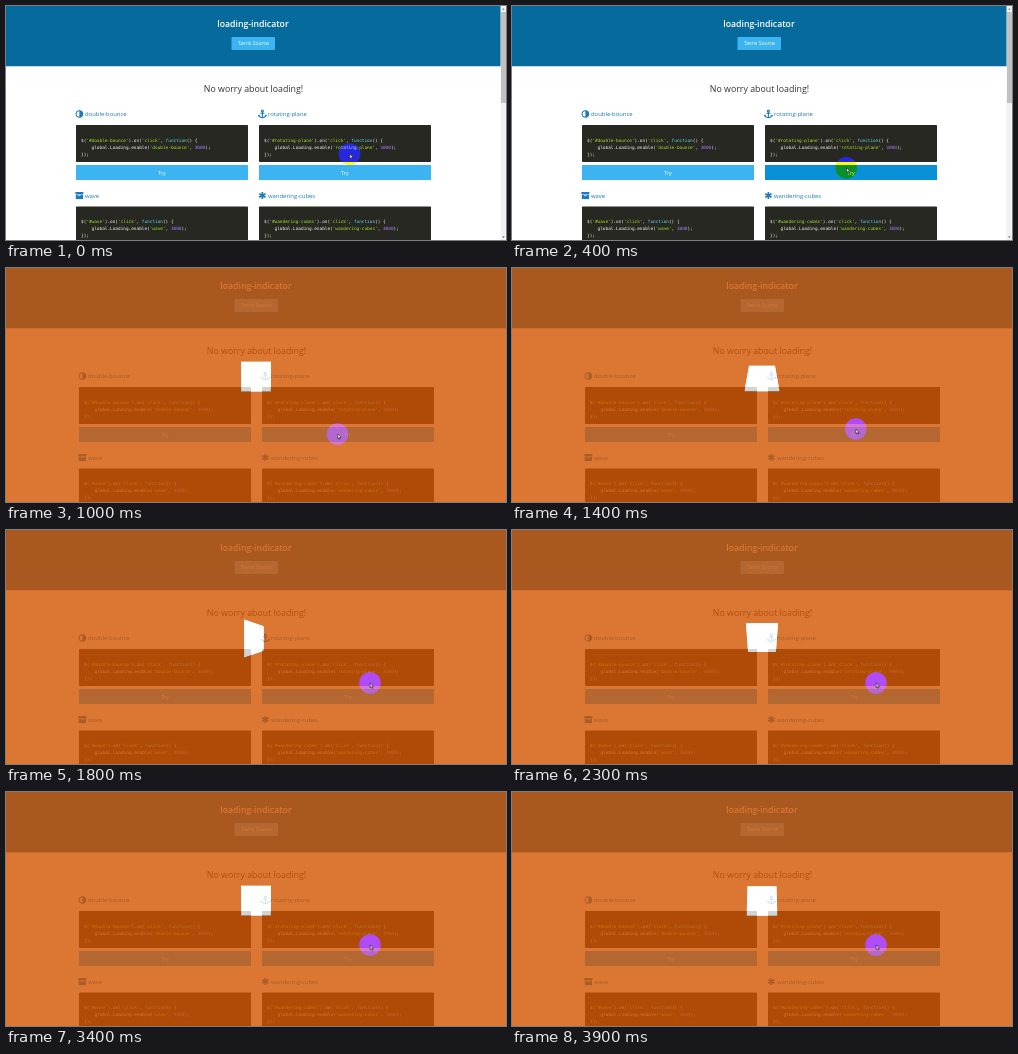
Write an HTML page with a canvas that moves like this. It is 500 px wide and 234 px high and loops after 4000 ms.

```html
<!DOCTYPE html>
<html lang="en">
<head>
<meta charset="utf-8">
<title>loading-indicator</title>
<style>
  html, body { margin: 0; width: 100%; height: 100%; overflow: hidden; background: #fff; }
  canvas { display: block; width: 500px; height: 234px; }
</style>
</head>
<body>
<canvas id="stage"></canvas>
<script>
const W = 500, H = 234, LOOP = 4000, STEP = 100, LOAD_START = 1000;
const SANS = '"Open Sans", "Noto Sans", sans-serif';
const MONO = '"DejaVu Sans Mono", monospace';
const BLUE = '#1a7bc0', BUTTON = '#3db4f2', BUTTON_HOVER = '#0a90d6';
const CODE = { bg: '#272822', plain: '#f8f8f2', string: '#a6e22e', keyword: '#66d9ef', number: '#ae81ff' };

const canvas = document.getElementById('stage');
const ctx = canvas.getContext('2d');
const ratio = window.devicePixelRatio || 1;
canvas.width = W * ratio;
canvas.height = H * ratio;

function rect(x, y, w, h, color, radius = 0) {
  ctx.fillStyle = color;
  ctx.beginPath();
  ctx.roundRect(x, y, w, h, radius);
  ctx.fill();
}

function text(str, x, y, font, color, align = 'left') {
  ctx.font = font;
  ctx.fillStyle = color;
  ctx.textAlign = align;
  ctx.fillText(str, x, y);
}

function polygon(points) {
  points.forEach(([x, y], i) => i ? ctx.lineTo(x, y) : ctx.moveTo(x, y));
  ctx.closePath();
}

// Icons are drawn around their own centre.
const icons = {
  adjust() {
    ctx.lineWidth = 1.1;
    ctx.beginPath();
    ctx.arc(0, 0, 3.3, 0, Math.PI * 2);
    ctx.stroke();
    ctx.beginPath();
    ctx.arc(0, 0, 3.4, -Math.PI / 2, Math.PI / 2);
    ctx.fill();
  },
  anchor() {
    ctx.lineWidth = 1.1;
    ctx.beginPath();
    ctx.arc(0, -3, 1, 0, Math.PI * 2);
    ctx.moveTo(0, -2);
    ctx.lineTo(0, 3.6);
    ctx.moveTo(-2, -0.8);
    ctx.lineTo(2, -0.8);
    ctx.moveTo(-3.7, 1.2);
    ctx.quadraticCurveTo(-3, 3.6, 0, 3.7);
    ctx.quadraticCurveTo(3, 3.6, 3.7, 1.2);
    ctx.stroke();
    ctx.beginPath();
    polygon([[-4.3, 2.6], [-4.1, 0.5], [-2.2, 1.7]]);
    polygon([[4.3, 2.6], [4.1, 0.5], [2.2, 1.7]]);
    ctx.fill();
  },
  archive() {
    ctx.fillRect(-4, -3.5, 8, 2);
    ctx.fillRect(-3.6, -1, 7.2, 4.6);
    ctx.fillStyle = '#fff';
    ctx.fillRect(-1.1, -0.4, 2.2, 0.8);
  },
  asterisk() {
    ctx.lineWidth = 1.7;
    ctx.beginPath();
    for (let i = 0; i < 3; i++) {
      const a = Math.PI / 2 + i * Math.PI / 3;
      ctx.moveTo(-3.6 * Math.cos(a), -3.6 * Math.sin(a));
      ctx.lineTo(3.6 * Math.cos(a), 3.6 * Math.sin(a));
    }
    ctx.stroke();
  }
};

function codeLine(x, y, parts) {
  const font = `4.4px ${MONO}`;
  for (const [kind, str] of parts) {
    text(str, x, y, font, CODE[kind]);
    x += ctx.measureText(str).width;
  }
}

function section(x, y, name, icon, hover) {
  ctx.save();
  ctx.translate(x + 3.4, y + 8);
  ctx.fillStyle = ctx.strokeStyle = BLUE;
  icons[icon]();
  ctx.restore();
  text(name, x + 9, y + 10.2, `5.9px ${SANS}`, BLUE);

  rect(x, y + 19, 172, 37, CODE.bg, 0.8);
  codeLine(x + 5, y + 35.8, [
    ['plain', '$('], ['string', `'#${name}'`], ['plain', ').on('], ['string', "'click'"],
    ['plain', ', '], ['keyword', 'function'], ['plain', '() {']
  ]);
  codeLine(x + 5, y + 42.8, [
    ['plain', '    global.Loading.enable('], ['string', `'${name}'`],
    ['plain', ', '], ['number', '3000'], ['plain', ');']
  ]);
  codeLine(x + 5, y + 49.8, [['plain', '});']]);

  rect(x, y + 59, 172, 15, hover ? BUTTON_HOVER : BUTTON, 0.6);
  text('Try', x + 86, y + 68.6, `5.4px ${SANS}`, '#fff', 'center');
}

function scrollbar() {
  rect(494.5, 0, 5.5, H, '#f1f1f1');
  rect(495, 6, 5, 91, '#c1c1c1');
  ctx.fillStyle = '#555';
  ctx.beginPath();
  polygon([[496.2, 3.6], [497.4, 2.2], [498.6, 3.6]]);
  polygon([[496.2, 230.6], [497.4, 232], [498.6, 230.6]]);
  ctx.fill();
}

function page(loading, hover) {
  const shift = loading ? 3 : 0;
  const middle = 247 + shift;
  rect(0, 0, W, H, '#fff');
  rect(0, 0, W, 60.3, '#076a9c');
  text('loading-indicator', middle, 21.4, `600 8.7px ${SANS}`, '#fff', 'center');
  rect(225.5 + shift, 31, 43.5, 13, BUTTON, 0.8);
  text('Tavrix Source', middle + 0.3, 39.3, `5px ${SANS}`, '#fff', 'center');
  text('No worry about loading!', middle + 0.5, 85.8, `8.8px ${SANS}`, '#333', 'center');

  const left = 70 + shift, right = 253 + shift;
  section(left, 100, 'double-bounce', 'adjust', false);
  section(right, 100, 'rotating-plane', 'anchor', hover);
  section(left, 181.5, 'wave', 'archive', false);
  section(right, 181.5, 'wandering-cubes', 'asterisk', false);
  if (!loading) scrollbar();
}

// cubic-bezier(.42, 0, .58, 1)
function easeInOut(x) {
  let lo = 0, hi = 1;
  for (let i = 0; i < 20; i++) {
    const s = (lo + hi) / 2, r = 1 - s;
    if (1.26 * r * r * s + 1.74 * r * s * s + s * s * s < x) lo = s;
    else hi = s;
  }
  return lo * lo * (3 - 2 * lo);
}

// Flips about the x axis, then about the y axis, seen in perspective.
function planeCorners(elapsed) {
  const half = 14.9, depth = 54;
  const phase = ((elapsed + 22) % 1200) / 600;
  const ax = -Math.PI * (phase < 1 ? easeInOut(phase) : 1);
  const ay = -Math.PI * (phase < 1 ? 0 : easeInOut(phase - 1));
  return [[-1, -1], [1, -1], [1, 1], [-1, 1]].map(([u, v]) => {
    const x = u * half * Math.cos(ay), z1 = -u * half * Math.sin(ay);
    const y = v * half * Math.cos(ax) - z1 * Math.sin(ax);
    const z = v * half * Math.sin(ax) + z1 * Math.cos(ax);
    const k = depth / (depth - z);
    return [250 + x * k, 108.6 + y * k];
  });
}

function loader(elapsed) {
  const corners = planeCorners(elapsed);
  ctx.globalAlpha = 0.8;
  ctx.fillStyle = '#d35400';
  ctx.beginPath();
  ctx.rect(0, 0, W, H);
  polygon(corners);
  ctx.fill('evenodd');
  ctx.fillStyle = '#fff';
  ctx.beginPath();
  polygon(corners);
  ctx.fill();
  ctx.globalAlpha = 1;
}

const path = [[0, 343.5, 148], [600, 331.5, 166], [1100, 331.5, 166], [1800, 364, 153], [LOOP, 364, 153]];

function cursorAt(t) {
  const i = path.findIndex(([time]) => time > t);
  const [t0, x0, y0] = path[i - 1], [t1, x1, y1] = path[i];
  const k = easeInOut((t - t0) / (t1 - t0));
  return [x0 + (x1 - x0) * k, y0 + (y1 - y0) * k];
}

function cursor(x, y) {
  ctx.globalCompositeOperation = 'difference';
  ctx.fillStyle = '#00f';
  ctx.beginPath();
  ctx.arc(x, y, 10.8, 0, Math.PI * 2);
  ctx.fill();
  ctx.globalCompositeOperation = 'source-over';

  ctx.save();
  ctx.translate(x, y);
  ctx.beginPath();
  polygon([[0.2, 0], [0.2, 4.6], [1.3, 3.7], [2, 5.3], [2.8, 4.9], [2.1, 3.4], [3.5, 3.3]]);
  ctx.lineWidth = 0.6;
  ctx.strokeStyle = '#111';
  ctx.fillStyle = '#fff';
  ctx.fill();
  ctx.stroke();
  ctx.restore();
}

function frame() {
  const t = Math.floor((performance.now() % LOOP) / STEP) * STEP;
  const loading = t >= LOAD_START;
  const [x, y] = cursorAt(t);
  ctx.setTransform(ratio, 0, 0, ratio, 0, 0);
  page(loading, !loading && y > 159);
  if (loading) loader(t - LOAD_START);
  cursor(x, y);
  requestAnimationFrame(frame);
}

frame();
</script>
</body>
</html>
```
